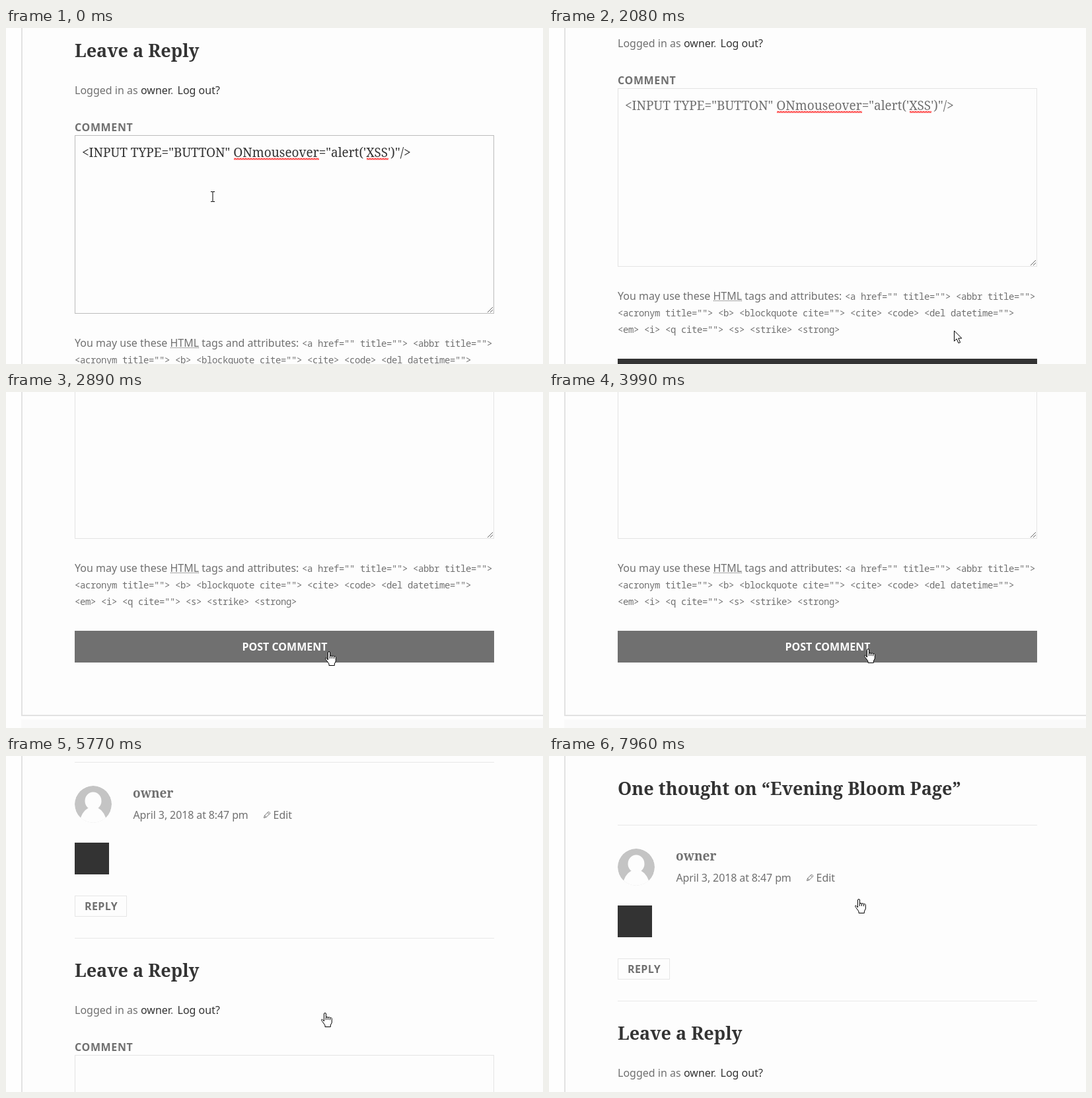
Write an HTML page that moves like this. It is 813 by 508 pixels and loops after 8000 ms.

```html
<!DOCTYPE html>
<html lang="en">
<head>
<meta charset="utf-8">
<title>Comment form</title>
<style>
  html, body { margin: 0; width: 100%; height: 100%; overflow: hidden; background: #fefefe; }
  svg { display: block; width: 813px; height: 508px; }
  text { white-space: pre; fill: #707070; font: 16px "Noto Sans", sans-serif; }
  .title { font: bold 27px "Noto Serif", serif; fill: #333; }
  .name { font: bold 19px "Noto Serif", serif; }
  .link { fill: #333; }
  .date { letter-spacing: -.12px; }
  .label { font-weight: bold; letter-spacing: .64px; }
  .small { font-weight: bold; letter-spacing: .4px; }
  .code { font: 14px "Noto Sans Mono", monospace; letter-spacing: -.4px; }
  .post { font-weight: bold; fill: #fff; text-anchor: middle; }
  .input { font: 19px "Noto Serif", serif; fill: #333; }
  .frame { fill: none; stroke: #e6e6e6; }
  .dark { fill: #333; }
  .rule { fill: #e8e8e8; }
  .edge { fill: #e2e2e2; }
  .outline { fill: #fff; stroke: #000; stroke-linejoin: round; }

  .page, .input, .area, .typed, .submit, .pointer, .beam, .arrow, .hand, .busy {
    animation: 8s step-end infinite;
  }
  .page { animation-name: scroll; }
  .input { animation-name: dim; }
  .area { animation-name: blur; }
  .typed { animation-name: typed; }
  .submit { animation-name: hover; }
  .pointer { animation-name: move; }
  .beam { animation-name: beam; }
  .arrow { animation-name: arrow; }
  .hand { animation-name: hand; }
  .busy { animation-name: busy; }

  @keyframes scroll {
    0% { transform: translateY(0); }
    24.125% { transform: translateY(-10px); }
    26% { transform: translateY(-71px); }
    27.5% { transform: translateY(-150px); }
    29.375% { transform: translateY(-205px); }
    30.875% { transform: translateY(-210px); }
    58.75% { transform: translateY(175px); }
    70.25% { transform: translateY(200px); }
    71.875% { transform: translateY(290px); }
    73.625% { transform: translateY(360px); }
    75.25%, 100% { transform: translateY(385px); }
  }
  @keyframes dim { 0% { fill: #333; } 19%, 100% { fill: #707070; } }
  @keyframes blur { 0% { stroke: #bcbcbc; } 19%, 100% { stroke: #e4e4e4; } }
  @keyframes typed { 0% { visibility: visible; } 58.75%, 100% { visibility: hidden; } }
  @keyframes hover { 0%, 58.75%, 100% { fill: #333; } 36.125% { fill: #707070; } }

  @keyframes move {
    0% { transform: translate(313px, 255px); }
    3.5% { transform: translate(335px, 212px); }
    5.25% { transform: translate(400px, 183px); }
    7% { transform: translate(495px, 192px); }
    8.75% { transform: translate(570px, 250px); }
    10.5% { transform: translate(603px, 340px); }
    12.25% { transform: translate(611px, 418px); }
    14% { transform: translate(613px, 457px); }
    32.5% { transform: translate(605px, 450px); }
    34.375% { transform: translate(530px, 430px); }
    36.125% { transform: translate(488px, 392px); }
    37.875% { transform: translate(482px, 388px); }
    80.625% { transform: translate(465px, 381px); }
    82.25% { transform: translate(420px, 365px); }
    84% { transform: translate(358px, 341px); }
    85.625% { transform: translate(296px, 318px); }
    87.25% { transform: translate(238px, 296px); }
    88.875% { transform: translate(186px, 276px); }
    90.625% { transform: translate(152px, 263px); }
    92.25% { transform: translate(138px, 258px); }
    97.625% { transform: translate(272px, 243px); }
    99.5%, 100% { transform: translate(468px, 216px); }
  }
  @keyframes beam { 0% { visibility: visible; } 14%, 100% { visibility: hidden; } }
  @keyframes arrow {
    0%, 36.125%, 49.875%, 65.25%, 90.625%, 100% { visibility: hidden; }
    14%, 44.5%, 61.875%, 80.625% { visibility: visible; }
  }
  @keyframes hand {
    0%, 44.5%, 61.875%, 80.625% { visibility: hidden; }
    36.125%, 49.875%, 65.25%, 90.625%, 100% { visibility: visible; }
  }
  @keyframes busy {
    0%, 49.875%, 65.25%, 100% { visibility: hidden; }
    44.5%, 61.875% { visibility: visible; }
  }
</style>
</head>
<body>
<svg viewBox="0 0 813 508">
  <defs>
    <pattern id="wave" width="4" height="3" patternUnits="userSpaceOnUse" patternTransform="translate(345 196.5)">
      <path d="M-1 1.5L0 2.5L2 .5L4 2.5L5 1.5" fill="none" stroke="#f00" stroke-width="1.2"/>
    </pattern>
    <clipPath id="round"><circle cx="132" cy="-217" r="28"/></clipPath>
  </defs>

  <g class="page">
    <rect x="24" y="-420" width="789" height="1120" fill="#fdfdfd"/>
    <rect x="23" y="705" width="790" height="300" fill="#fafafa"/>
    <rect class="edge" x="23" y="-420" width="2" height="1120"/>
    <rect class="edge" x="23" y="698" width="790" height="2"/>

    <!-- posted comment -->
    <text class="title" x="104" y="-326">One thought on “Evening Bloom Page”</text>
    <rect class="rule" x="104" y="-281" width="635" height="1"/>
    <g clip-path="url(#round)">
      <circle cx="132" cy="-217" r="28" fill="#c4c4c4"/>
      <path d="M110 -186Q114 -206 124 -211H140Q150 -206 154 -186z" fill="#fdfdfd"/>
      <ellipse cx="132" cy="-222" rx="12.5" ry="13.5" fill="#fdfdfd"/>
    </g>
    <text class="name" x="192" y="-227">owner</text>
    <text class="date" x="192.5" y="-195">April 3, 2018 at 8:47 pm</text>
    <path d="M390.5 -196.5l1-3.500 6-6 2.500 2.500-6 6zM396 -204.500l2.500 2.500M391.500 -200l2.500 2.500" fill="none" stroke="#707070"/>
    <text x="404.5" y="-195">Edit</text>
    <rect class="dark" x="104" y="-159" width="52" height="48"/>
    <rect class="frame" x="104.5" y="-78.5" width="78" height="31"/>
    <text class="small" x="119" y="-57">REPLY</text>
    <rect class="rule" x="104" y="-15" width="635" height="1"/>

    <!-- reply form -->
    <text class="title" x="104" y="44">Leave a Reply</text>
    <text x="104" y="100">Logged in as <tspan class="link" x="204">owner</tspan>. <tspan class="link" x="259.5">Log out?</tspan></text>
    <text class="label" x="104" y="156">COMMENT</text>
    <rect class="frame area" x="104.5" y="162.5" width="634" height="269"/>
    <path d="M729 430l8-8M733 430l4-4" stroke="#666"/>
    <g class="typed">
      <text class="input" x="115" y="195">&lt;INPUT TYPE="BUTTON" ONmouseover="alert('XSS')"/&gt;</text>
      <path d="M345 196.500h129v3h-129zM546 196.500h33v3h-33z" fill="url(#wave)"/>
    </g>
    <text x="104" y="482">You may use these HTML tags and attributes:</text>
    <path d="M249 483.500h44" stroke="#555" stroke-dasharray="1 1"/>
    <text class="code" x="448" y="482">&lt;a href="" title=""&gt; &lt;abbr title=""&gt;</text>
    <text class="code" x="104" y="507">&lt;acronym title=""&gt; &lt;b&gt; &lt;blockquote cite=""&gt; &lt;cite&gt; &lt;code&gt; &lt;del datetime=""&gt;</text>
    <text class="code" x="104" y="532">&lt;em&gt; &lt;i&gt; &lt;q cite=""&gt; &lt;s&gt; &lt;strike&gt; &lt;strong&gt;</text>
    <rect class="submit" x="104" y="571" width="635" height="48"/>
    <text class="post" x="422" y="601">POST COMMENT</text>
  </g>

  <g class="pointer">
    <path class="beam" d="M-3 -7.500h2.500l.5.500.5-.500H3M0 -7.500v15M-3 7.500h2.500l.5-.500.5.500H3" fill="none" stroke="#000"/>
    <path class="outline arrow" d="M.5.8v15.700l3.600-3.500 2.900 6.400 2.600-1.100-2.800-6.200h5z"/>
    <circle class="busy" cx="17" cy="8" r="4" fill="none" stroke="#3a9bd8" stroke-width="2"/>
    <path class="outline hand" transform="translate(-5)" d="M4.500 13V2a1.500 1.500 0 0 1 3 0v6a1.500 1.500 0 0 1 3 0a1.500 1.500 0 0 1 3 .7a1.400 1.400 0 0 1 2.800 1.200V15l-2 4v2.500H6V19L2 13.500C0 11.500 .5 9.500 2 10.300zM7.500 8v3M10.500 8v3M13.500 8.700v2.500"/>
  </g>
</svg>
</body>
</html>
```
